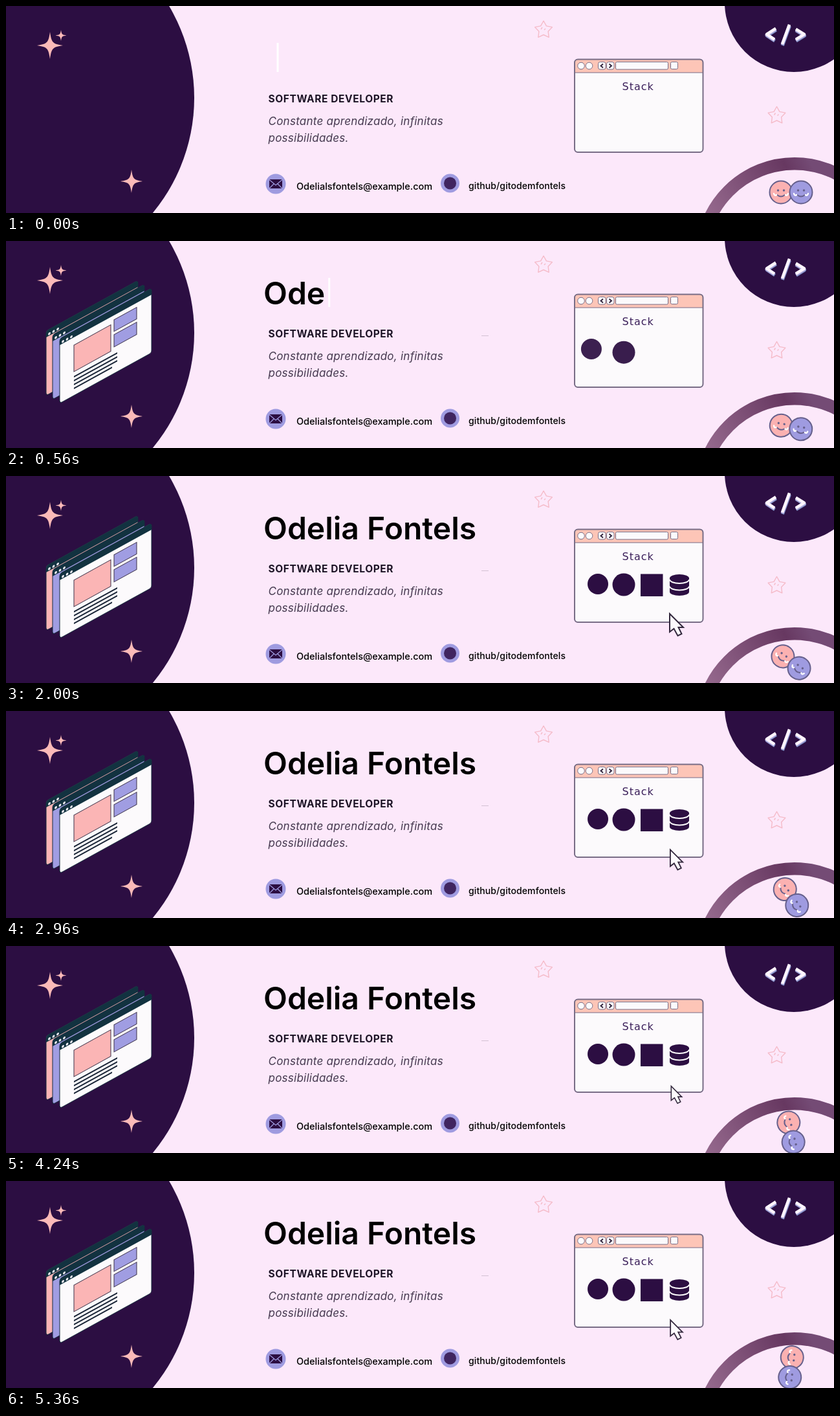
Write an HTML page that moves like this. It is 1280 px wide and 320 px high and loops after 5.44 s.

```html
<!DOCTYPE html>
<html lang="pt">
<head>
<meta charset="utf-8">
<title>Software developer banner</title>
<style>
  html, body { margin: 0; width: 100%; height: 100%; overflow: hidden; background: #fce8fa; }
  svg { display: block; width: 1280px; height: 320px; font-family: Inter, "Open Sans", sans-serif; }
  text { white-space: pre; }
</style>
</head>
<body>
<svg viewBox="0 0 1280 320">
  <defs>
    <linearGradient id="ringFill" gradientUnits="userSpaceOnUse" x1="1080" y1="320" x2="1240" y2="235">
      <stop offset="0" stop-color="#966a8e"/>
      <stop offset=".8" stop-color="#673861"/>
      <stop offset="1" stop-color="#744b75"/>
    </linearGradient>
    <path id="spark" d="M0-1C.12-.2 .2-.12 1 0C.2 .12 .12 .2 0 1C-.12 .2-.2 .12-1 0C-.2-.12-.12-.2 0-1Z"/>
    <path id="star" fill="none" stroke="#f5bbc9" stroke-width="1.4" stroke-linejoin="round"/>
    <g id="sheet">
      <rect width="142" height="100" rx="4" stroke="#152b3c"/>
      <path d="M0 10V4Q0 0 4 0H138Q142 0 142 4V10Z" fill="#123240"/>
      <g fill="#f4f0f8">
        <circle cx="5" cy="7" r="1.900"/><circle cx="11.5" cy="7" r="1.900"/><circle cx="18" cy="7" r="1.900"/>
      </g>
    </g>
    <g id="face" stroke="#66608c" stroke-width="2">
      <circle r="17.500"/>
      <path d="M-6 4Q0 9 6 4" fill="none" stroke-linecap="round"/>
      <path d="M-11 2Q-10 6-7 4M11 2Q10 6 7 4" fill="none" stroke="#fff" stroke-width="2.400" stroke-linecap="round"/>
      <circle cx="-4.500" cy="-3" r="1.700" fill="#66608c" stroke="none"/>
      <circle cx="4.500" cy="-3" r="1.700" fill="#66608c" stroke="none"/>
    </g>
    <path id="tag" d="M15-9L1 0L13 8M36-15L25 15M46-8L59 0L46 8" fill="none" stroke-linejoin="round"/>
  </defs>

  <!-- Backdrop -->
  <rect width="1280" height="320" fill="#fce8fa"/>
  <g fill="#2c0e42">
    <circle cx="12.500" cy="142" r="278.500"/>
    <circle cx="1218" cy="-5" r="107"/>
  </g>
  <circle cx="1219" cy="388" r="144.200" fill="none" stroke="url(#ringFill)" stroke-width="19.500"/>
  <g fill="#fbbab8">
    <use href="#spark" transform="translate(68 61) scale(20 21)"/>
    <use href="#spark" transform="translate(85 45.500) scale(8.500)"/>
    <use href="#spark" transform="translate(194 271) scale(17 18)"/>
  </g>
  <use href="#star" x="831" y="37"/>
  <use href="#star" x="1191.500" y="169.500"/>

  <!-- Stacked pages -->
  <g id="pages" stroke-width="1">
    <use href="#sheet" transform="matrix(1 -.55 0 1 62 139)" fill="#fbb5b5"/>
    <use href="#sheet" transform="matrix(1 -.55 0 1 72 145)" fill="#a09de2"/>
    <g transform="matrix(1 -.55 0 1 83 151)">
      <use href="#sheet" fill="#fcfafc"/>
      <g stroke="#3b3048">
        <rect x="22" y="22" width="57" height="41" fill="#fbb5b5"/>
        <rect x="84" y="17" width="35" height="18" fill="#a09de2"/>
        <rect x="84" y="40" width="35" height="19" fill="#a09de2"/>
        <path d="M22 71H89M22 77H89M22 83H89M22 89H81" stroke="#1b2638" stroke-width="2.200"/>
      </g>
    </g>
  </g>

  <!-- Copy -->
  <text id="title" x="398" y="98" font-size="48" font-weight="600"/>
  <rect id="caret" y="57" width="3" height="45" fill="#fff"/>
  <text x="405.500" y="149" font-size="15.500" font-weight="700" letter-spacing=".6" fill="#1d1426">SOFTWARE DEVELOPER</text>
  <g font-size="17" font-style="italic" letter-spacing=".25" fill="#463a50">
    <text x="405.500" y="184">Constante aprendizado, infinitas</text>
    <text x="405.500" y="210">possibilidades.</text>
  </g>
  <path id="dash" d="M735 146.500H746" stroke="#d3c1d3"/>
  <g font-weight="500">
    <text x="449" y="284" font-size="14.500">Odelialsfontels@example.com</text>
    <text x="715" y="283" font-size="14" letter-spacing=".1">github/gitodemfontels</text>
  </g>
  <circle cx="417" cy="275" r="15.500" fill="#9f9be0"/>
  <rect x="407" y="268" width="20" height="14" rx="1" fill="#2c0e42"/>
  <path d="M407 268.500L417 277L427 268.500M407 282L414 275M427 282L420 275" fill="none" stroke="#9f9be0" stroke-width="1.200"/>
  <circle cx="686.500" cy="274" r="14.500" fill="#9f9be0"/>
  <circle cx="686.500" cy="274" r="9.500" fill="#402560"/>

  <!-- Browser -->
  <g stroke="#786d86">
    <rect x="879" y="82.500" width="198.500" height="143.500" rx="5" fill="#fcfafc"/>
    <path d="M879 103V87.500Q879 82.500 884 82.500H1072.500Q1077.500 82.500 1077.500 87.500V103Z" fill="#fdc5b7"/>
    <rect x="879" y="82.500" width="198.500" height="143.500" rx="5" fill="none" stroke-width="2"/>
    <g fill="#fcfafc">
      <circle cx="889" cy="92.500" r="5.300"/><circle cx="901.500" cy="92.500" r="5.300"/>
      <rect x="915.500" y="86.500" width="11.500" height="11.500" rx="3"/>
      <rect x="928.500" y="86.500" width="11.500" height="11.500" rx="3"/>
      <rect x="942.500" y="86.500" width="81" height="11.500" rx="2"/>
      <rect x="1027.500" y="86.500" width="11" height="11" rx="2"/>
    </g>
    <path d="M923 89.500L919.500 92.500L923 95.500M932.500 89.500L936 92.500L932.500 95.500" fill="none" stroke="#2d2039" stroke-width="1.800"/>
  </g>
  <text x="952.500" y="130" font-family="DejaVu Sans, sans-serif" font-size="16" letter-spacing="1" fill="#3b1f5a">Stack</text>
  <g fill="#2c0e42">
    <circle id="iconA" cx="915" cy="167" r="16"/>
    <circle id="iconB" cx="955" cy="168" r="17.500"/>
    <rect id="iconC" x="981" y="151.500" width="34.500" height="34.500"/>
    <g id="iconD">
      <path d="M1026 158V179A15 6 0 0 0 1056 179V158Z"/>
      <ellipse cx="1041" cy="158" rx="15" ry="6"/>
      <path d="M1026 160A15 6 0 0 0 1056 160M1026 170.500A15 6 0 0 0 1056 170.500" fill="none" stroke="#fcfafc" stroke-width="2"/>
    </g>
  </g>

  <!-- Floating parts -->
  <g id="code">
    <use href="#tag" x=".5" y="2.500" stroke="#7388bd" stroke-width="5"/>
    <use href="#tag" y="1.500" stroke="#b4addf" stroke-width="5"/>
    <use href="#tag" stroke="#fff6ff" stroke-width="4.500"/>
  </g>
  <g id="faces">
    <use href="#face" x="-15.500" fill="#fbb1b1"/>
    <use href="#face" x="15.500" fill="#9f9be0"/>
  </g>
  <path id="pointer" d="M-10.500-17V11L-4 6L2 17L8 14L3 4H10.500Z" fill="#fcfafc" stroke="#33283d" stroke-width="2"/>
</svg>
<script>
const LOOP = 5440, STEP = 80, NAME = "Odelia Fontels";
const $ = id => document.getElementById(id);
const progress = (t, from, to) => Math.min(1, Math.max(0, (t - from) / (to - from)));
const easeOut = p => 1 - (1 - p) ** 3;
const wave = (t, peak, period) => Math.cos(2 * Math.PI * (t - peak) / period);

function place(id, x, y, opacity = 1, extra = "") {
  $(id).setAttribute("transform", `translate(${x} ${y}) ${extra}`);
  $(id).setAttribute("opacity", opacity);
}

const starPoints = Array.from({ length: 10 }, (_, i) => {
  const r = i % 2 ? 7.5 : 14, a = (i / 5 - .5) * Math.PI;
  return `${r * Math.cos(a)} ${r * Math.sin(a)}`;
});
$("star").setAttribute("d", `M${starPoints.join("L")}ZM-4-1L-2-4M1 0L3-2`);

function drawTitle(t) {
  const count = Math.min(NAME.length, Math.max(0, Math.floor((t - 150) / 125)));
  const title = $("title");
  title.textContent = NAME.slice(0, count);
  $("caret").setAttribute("x", count ? 403 + title.getComputedTextLength() : 418.5);
  $("caret").setAttribute("opacity", t < 1960 ? 1 : 0);
}

function draw(t) {
  drawTitle(t);
  const pages = easeOut(progress(t, 0, 480));
  place("pages", 0, 16 * (1 - pages), pages);
  $("dash").setAttribute("opacity", t < 160 ? 0 : 1);

  const a = progress(t, 240, 800), b = progress(t, 320, 720);
  const c = progress(t, 560, 960), d = easeOut(progress(t, 640, 1200));
  place("iconA", -55 * (1 - a) ** 2, 0, easeOut(a));
  place("iconB", 0, 26 * (1 - b) ** 2, easeOut(b));
  place("iconC", 0, 20 * (1 - easeOut(c)), c);
  place("iconD", 1041, 168, d, `scale(${d}) translate(-1041 -168)`);

  // The pointer rises in, then gently shrinks and grows.
  const rise = progress(t, 880, 1440);
  const size = t < 2000 ? 1 : .89 + .11 * wave(t, 2000, 4480);
  place("pointer", 1036.5, 230 + 54 * (1 - rise) ** 2, progress(t, 840, 1200), `scale(${size})`);

  place("code", 1175, 42.5 - 1.5 * wave(t, 1560, 4000));
  place("faces", 1213.5, 288, 1, `rotate(${t * .018})`);
}

const start = performance.now();
function tick() {
  const t = (performance.now() - start) % LOOP;
  draw(Math.floor(t / STEP) * STEP);
  requestAnimationFrame(tick);
}
tick();
</script>
</body>
</html>
```
